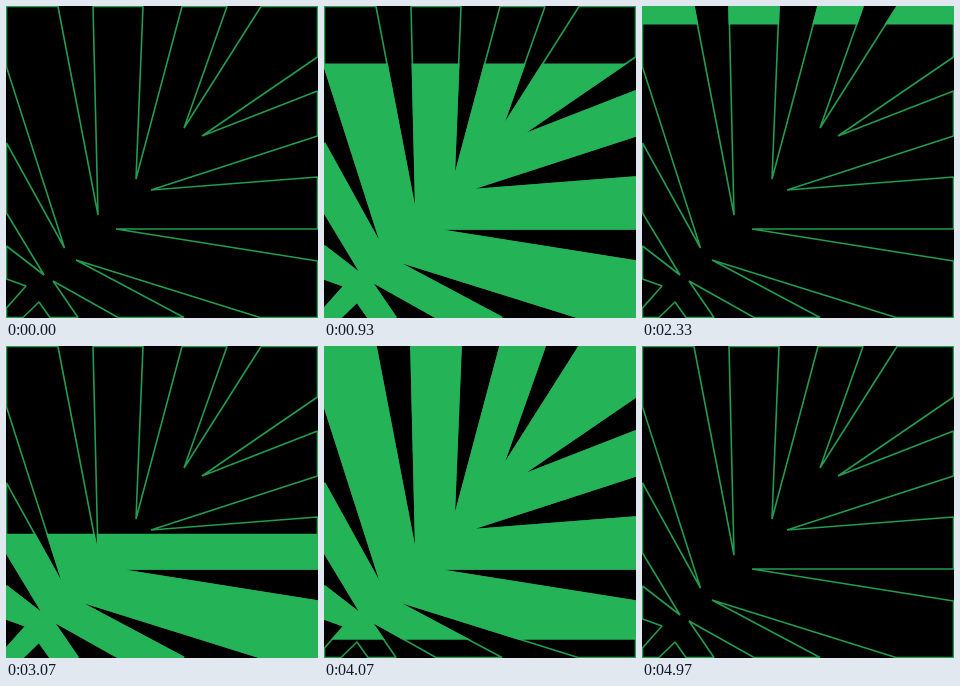
Write an HTML page with a canvas that moves like this. It is 312 px wide and 312 px high and loops after 5010 ms.

```html
<!DOCTYPE html>
<html lang="en">
<head>
<meta charset="utf-8">
<title>Leaf fill</title>
<style>
  html, body { margin: 0; width: 100%; height: 100%; overflow: hidden; background: #000; }
  canvas { display: block; }
</style>
</head>
<body>
<canvas id="stage" width="312" height="312"></canvas>
<script>
const SIZE = 312;
const CYCLE = 2505;       // one fill and one drain; two cycles per 5010 ms loop
const GREEN = "#25b358";
const LINE = "#229c4e";
const ctx = document.getElementById("stage").getContext("2d");

const clamp = (v, low, high) => Math.min(Math.max(v, low), high);

// Point on the stage border, s pixels clockwise from the top left corner
function border(s) {
  const inset = v => clamp(v, 0.5, SIZE - 0.5);
  return [inset(Math.min(s, 3 * SIZE - s)), inset(Math.min(s - SIZE, 4 * SIZE - s))];
}

// Gaps between the leaflets: tip x, tip y, then the border span of the open end
const gaps = [
  [92, 209, 52, 87], [130, 173, 137, 176], [178, 122, 221, 255],
  [196, 130, 363, 397], [145, 184, 442, 483], [110, 223, 535, 567],
  [70, 254, 682, 758], [47, 275, 824, 864], [33, 296, 892, 919],
  [20, 280, 946, 975], [38, 269, 1008, 1041], [58.5, 242, 1111, 1187]
];

function makeLeaf() {
  const path = new Path2D();
  let last = -1;
  for (const [x, y, from, to] of gaps) {
    for (let corner = 0; corner < 4 * SIZE; corner += SIZE) {
      if (corner > last && corner < from) path.lineTo(...border(corner));
    }
    path.lineTo(...border(from));
    path.lineTo(x, y);
    path.lineTo(...border(to));
    last = to;
  }
  path.closePath();
  return path;
}
const leaf = makeLeaf();

// Height of an edge rising from the bottom with sine easing
function edge(t, start, length, travel) {
  const p = clamp((t - start) / length, 0, 1);
  return SIZE + 1 - travel * (1 - Math.cos(Math.PI * p)) / 2;
}

function outline(color) {
  ctx.strokeStyle = color;
  ctx.stroke(leaf);
}

function draw(time) {
  const t = time % CYCLE;
  const top = edge(t, 0, 1300, 314);
  const bottom = edge(t, 1378, 1210, 330);

  ctx.fillStyle = "#000";
  ctx.fillRect(0, 0, SIZE, SIZE);
  ctx.lineWidth = 1.6;
  ctx.lineJoin = "bevel";
  outline(LINE);

  if (bottom > Math.max(top, 0)) {
    ctx.save();
    ctx.beginPath();
    ctx.rect(0, top, SIZE, bottom - top);
    ctx.clip();
    ctx.fillStyle = GREEN;
    ctx.fill(leaf);
    outline(GREEN);
    ctx.restore();
  }
}

const begin = performance.now();
function tick() {
  draw(performance.now() - begin);
  requestAnimationFrame(tick);
}
tick();
</script>
</body>
</html>
```
